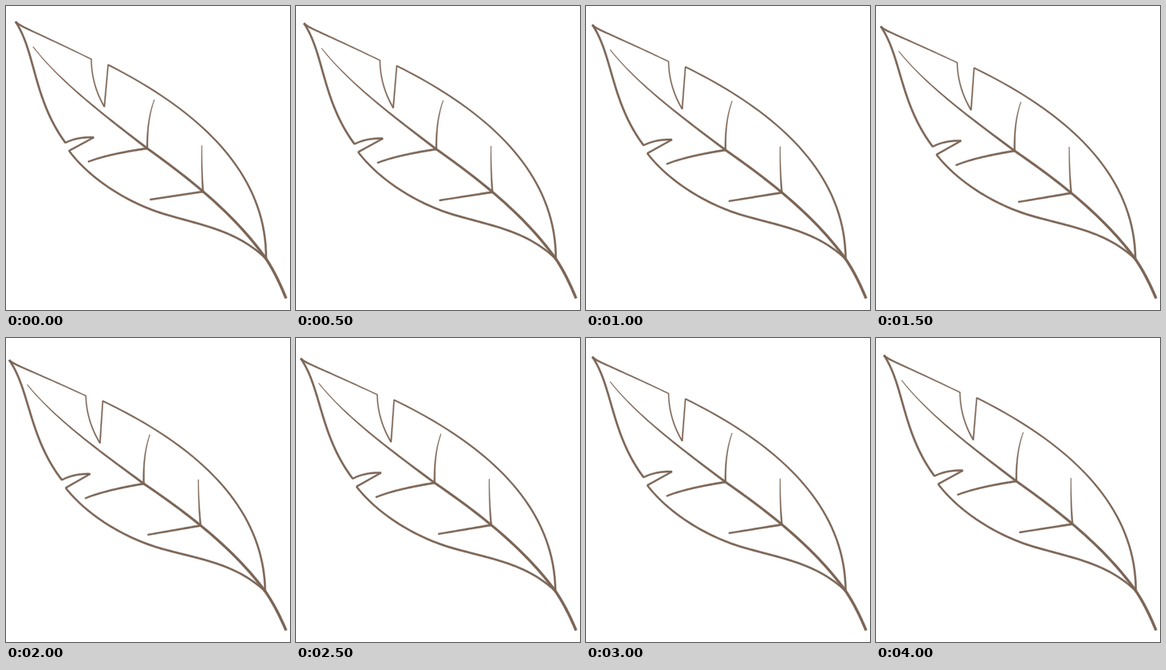
An HTML page that plays this animation: 356x380 px, repeating every 4500 ms.

```html
<!DOCTYPE html>
<html lang="en">
<head>
<meta charset="utf-8">
<title>Swaying leaf</title>
<style>
  html, body { margin: 0; width: 100%; height: 100%; overflow: hidden; background: #fff; }
  svg { display: block; width: 356px; height: 380px; }
</style>
</head>
<body>
<svg viewBox="0 0 356 380">
  <g id="leaf" fill="#7a6455" stroke="#7a6455" stroke-width="0.5" stroke-linejoin="round"></g>
</svg>
<script>
const leaf = document.getElementById('leaf');
const STEP = 500, STEPS = 9, TURN = -0.333;
const PIVOT = [351, 365];

const lerp = (a, b, t) => a + (b - a) * t;

// Point on a Bezier curve with any number of control points
function bezier(points, t) {
  if (points.length === 1) return points[0];
  return bezier(points.slice(1).map((p, i) =>
    [lerp(points[i][0], p[0], t), lerp(points[i][1], p[1], t)]), t);
}

// Filled stroke whose width changes evenly from one end to the other
function brush(from, to, ...points) {
  const left = [], right = [], count = 40;
  for (let i = 0; i <= count; i++) {
    const t = i / count;
    const [x, y] = bezier(points, t);
    const a = bezier(points, t - 0.01), b = bezier(points, t + 0.01);
    const dx = b[0] - a[0], dy = b[1] - a[1];
    const s = (lerp(from, to, t) - 0.5) / 2 / Math.hypot(dx, dy);
    left.push([x - dy * s, y + dx * s]);
    right.unshift([x + dy * s, y - dx * s]);
  }
  const path = document.createElementNS('http://www.w3.org/2000/svg', 'path');
  path.setAttribute('d', 'M' + left.concat(right).join('L') + 'Z');
  leaf.append(path);
}

const tip = [12, 19.7], fork = [177, 178], node = [247, 232], base = [326, 316];
const topNotch = [[107, 66.5], [123.3, 126], [128, 73.5]];
const sideNotch = [[74.5, 171], [110, 164.3], [79, 181]];
const belly = [200, 260.5];

// Upper edge
brush(2.8, 1.5, tip, [18, 26], [30, 29], topNotch[0]);
brush(1.5, 1.9, topNotch[0], [107, 90], [114, 110], topNotch[1]);
brush(1.9, 1.7, topNotch[1], topNotch[2]);
brush(2, 2.6, topNotch[2], [226, 123], [327, 199], base);

// Lower edge
brush(2.6, 2.7, tip, [37, 57], [34, 116], sideNotch[0]);
brush(2.3, 2.6, sideNotch[0], [84, 166], [97, 163.5], sideNotch[1]);
brush(2.3, 2.5, sideNotch[1], sideNotch[2]);
brush(2.5, 2.7, sideNotch[2], [106, 217], [154, 247], belly);
brush(2.7, 2.6, belly, [247, 274.5], [290, 281], base);

// Midrib and stem
brush(1.1, 3, [34, 51], [68, 95], [125, 138], fork);
brush(3, 3.5, fork, [226, 213], [285, 258], base);
brush(3.5, 3.5, base, [336, 331], [344, 348], [351, 365.3]);

// Side veins
brush(1, 2.4, [186, 117], [179, 136], [177, 156], fork);
brush(1, 2.4, [245.5, 174.5], [245, 205], node);
brush(2.3, 2.8, [103, 194.7], [128, 185], fork);
brush(2.3, 2.8, [180.5, 242], node);

function draw(now) {
  const step = Math.floor(now / STEP) % STEPS;
  // Rise to 4, then fall, resting one step longer at 2
  const sway = step < 6 ? 4 - Math.abs(4 - step) : Math.min(2, STEPS - step);
  leaf.setAttribute('transform', `rotate(${sway * TURN} ${PIVOT})`);
}

const start = performance.now();
function tick() {
  draw(performance.now() - start);
  requestAnimationFrame(tick);
}
tick();
</script>
</body>
</html>
```
